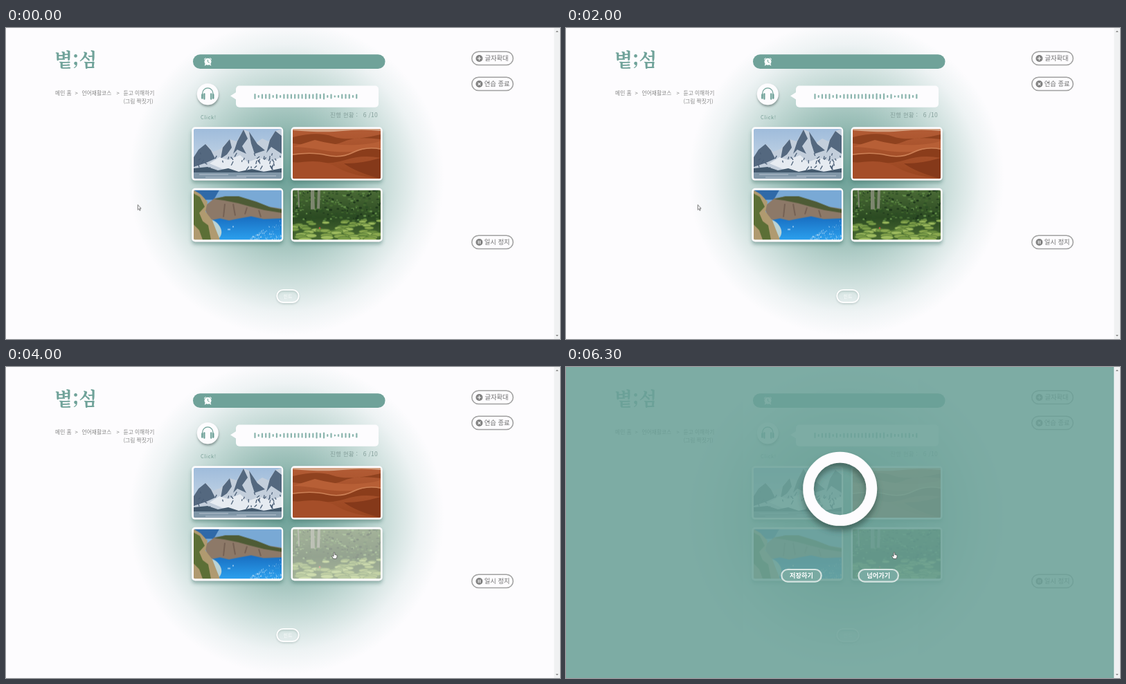
An HTML page for the animation above (6400 ms loop, 800 px wide and 450 px high).

```html
<!DOCTYPE html>
<html lang="ko">
<head>
<meta charset="utf-8">
<title>듣고 이해하기</title>
<style>
  html, body { margin: 0; width: 100%; height: 100%; overflow: hidden; background: #fdfcfe; }
  svg.stage { display: block; width: 100vw; height: 100vh; }
  text { font-family: "Noto Sans CJK KR", "Noto Sans CJK", "Noto Sans", sans-serif; }
  .brand { font: 700 27px "Noto Serif CJK KR", "Noto Serif", serif; fill: #6fa299; }
  .path { font-size: 7.75px; fill: #858585; }
  .side text { font-size: 9.25px; fill: #6e6e6e; }
  .status { font-size: 8.5px; letter-spacing: .25px; fill: #849f9a; }
  .click { font-size: 7.4px; font-weight: 500; letter-spacing: .6px; fill: #789f97; }
  .choice { font-size: 9.2px; font-weight: 700; fill: #fff; text-anchor: middle; }
  .hint { font-size: 7.2px; fill: #f8fbfa; text-anchor: middle; }

  .modal, .cursor, .arrow, .hand, .cove, .forest { animation: 6400ms linear infinite; }
  .modal { animation-name: slide; }
  .cursor { animation-name: travel; }
  .arrow { animation-name: arrow; }
  .hand { animation-name: hand; }
  .cove { animation-name: pass; }
  .forest { animation-name: hover; }

  @keyframes slide {
    0%, 76.7% { transform: translateY(450px); animation-timing-function: ease; }
    81.4%, 100% { transform: translateY(0); }
  }
  @keyframes travel {
    0%, 39.8% { transform: translate(190px, 255.5px); animation-timing-function: ease-in; }
    45.3% { transform: translate(235.5px, 255px); }
    51% { transform: translate(398px, 263px); animation-timing-function: ease-out; }
    56%, 100% { transform: translate(474px, 268px); }
  }
  @keyframes arrow {
    0%, 46.5% { opacity: 1; }
    46.51%, 100% { opacity: 0; }
  }
  @keyframes hand {
    0%, 46.5% { opacity: 0; }
    46.51%, 100% { opacity: 1; }
  }
  @keyframes pass {
    0%, 46.5% { opacity: 1; }
    48.5%, 51% { opacity: .5; }
    53%, 100% { opacity: 1; }
  }
  @keyframes hover {
    0%, 51.5% { opacity: 1; }
    54%, 81.4% { opacity: .5; }
    85%, 100% { opacity: 1; }
  }
</style>
</head>
<body>
<svg class="stage" viewBox="0 0 800 450" preserveAspectRatio="none">
  <defs>
    <radialGradient id="glow" gradientUnits="userSpaceOnUse" cx="405" cy="217" r="228">
      <stop offset="0" stop-color="#6fa299"/>
      <stop offset=".3" stop-color="#8fb7af"/>
      <stop offset=".6" stop-color="#c3d9d5"/>
      <stop offset=".85" stop-color="#eef3f4"/>
      <stop offset="1" stop-color="#fdfcfe"/>
    </radialGradient>
    <linearGradient id="sky" x2="0" y2="1">
      <stop stop-color="#9fbcdb"/><stop offset="1" stop-color="#d4dfea"/>
    </linearGradient>
    <linearGradient id="sand" x2="0" y2="1">
      <stop stop-color="#b35c35"/><stop offset="1" stop-color="#98441f"/>
    </linearGradient>
    <linearGradient id="bay" x2="0" y2="1">
      <stop stop-color="#1769bd"/><stop offset="1" stop-color="#2ba0ee"/>
    </linearGradient>
    <linearGradient id="wood" x2="0" y2="1">
      <stop stop-color="#4a6a36"/><stop offset=".55" stop-color="#2b4a22"/><stop offset="1" stop-color="#4b6b33"/>
    </linearGradient>
    <clipPath id="frame"><rect width="127" height="72" rx="2"/></clipPath>
    <filter id="shade" x="-20%" y="-20%" width="140%" height="150%">
      <feDropShadow dx="0" dy="4" stdDeviation="2.5" flood-color="#396d64" flood-opacity=".42"/>
    </filter>
    <filter id="soft" x="-20%" y="-20%" width="140%" height="160%">
      <feDropShadow dx="0" dy="1.5" stdDeviation="1.2" flood-color="#4d6f69" flood-opacity=".3"/>
    </filter>
    <filter id="lift" x="-30%" y="-30%" width="160%" height="170%">
      <feDropShadow dx=".5" dy="2.5" stdDeviation="1.6" flood-color="#4d5f5c" flood-opacity=".55"/>
    </filter>
    <filter id="ring" x="-30%" y="-30%" width="160%" height="170%">
      <feDropShadow dx="0" dy="7" stdDeviation="4.5" flood-color="#2f4b46" flood-opacity=".65"/>
    </filter>
  </defs>

  <rect width="800" height="450" fill="#fdfcfe"/>
  <circle cx="405" cy="217" r="228" fill="url(#glow)"/>

  <text class="brand" x="70" y="56">볕;섬</text>
  <g class="path">
    <text x="71" y="97">메인 홈</text>
    <text x="99.5" y="97">&gt;</text>
    <text x="109.5" y="97">언어재활코스</text>
    <text x="159.5" y="97">&gt;</text>
    <text x="169.5" y="97">듣고 이해하기</text>
    <text x="169.5" y="108.5">(그림 짝짓기)</text>
  </g>

  <!-- timer bar -->
  <rect x="270" y="38.3" width="277.5" height="20.7" rx="10.3" fill="#6fa299"/>
  <g transform="translate(291.5 48.8)" fill="#fff">
    <circle r="5"/>
    <path d="M-5.6-2.6A3 3 0 0 1-2.2-5.6ZM5.6-2.6A3 3 0 0 0 2.2-5.6ZM-3.6 3l-1.4 2.4h1.6l1.4-1.4ZM3.6 3l1.4 2.4H3.4L2 4Z"/>
    <path d="M0-3V.3L2.2 1.6" fill="none" stroke="#6fa299"/>
  </g>

  <!-- sound prompt -->
  <g filter="url(#lift)"><circle cx="291.3" cy="95.7" r="15.5" fill="#fdfcfe"/></g>
  <g transform="translate(291.3 96)" fill="#6fa299">
    <path d="M-7.6 3V-1.5a7.6 7.6 0 0 1 15.2 0V3" fill="none" stroke="#6fa299" stroke-width="1.3"/>
    <rect x="-9.2" y="-.8" width="2.6" height="7.6" rx="1.2"/>
    <rect x="-6" y="-1.8" width="2.2" height="9.6" rx="1"/>
    <rect x="3.8" y="-1.8" width="2.2" height="9.6" rx="1"/>
    <rect x="6.6" y="-.8" width="2.6" height="7.6" rx="1.2"/>
  </g>
  <text class="click" x="281" y="131.5">Click!</text>
  <path d="M324 98.2 333 92.5V104Z" fill="#fdfcfe"/>
  <rect x="332" y="83.5" width="206" height="31.3" rx="5" fill="#fdfcfe"/>
  <g id="wave" fill="#8ab4ad"></g>
  <text class="status" x="468" y="129">진행 현황 :</text>
  <text class="status" x="515.8" y="129">6 /10</text>

  <!-- picture cards -->
  <g id="cards" fill="#fdfcfe" filter="url(#shade)"></g>

  <g transform="translate(271 146)" clip-path="url(#frame)">
    <rect width="127" height="72" fill="url(#sky)"/>
    <path d="M0 44 9 30 18 22 28 33 39 29 52 15 62 18 72 1 80 4 90 20 99 14 108 18 118 3 127 0V72H0Z" fill="#c3cedb"/>
    <path d="M0 41 7 30 17 22 25 31 31 43 18 49 0 55ZM42 27 52 15 55 27 48 37 39 43ZM72 1 78 14 70 25 76 36 63 30 57 36 63 18ZM80 4 92 22 103 31 88 36 83 21ZM118 3 127 10V36L112 26 105 35 110 16Z" fill="#54687f"/>
    <path d="M23 50 37 41 50 45 67 38 78 48 95 42 112 47 127 41V57L106 62 88 58 64 63 42 58Z" fill="#e6ebf1"/>
    <g id="crags" stroke="#4b5f77" stroke-width="1.3"></g>
    <path d="M0 57 20 55 35 60 50 57 65 62 84 58 101 62 127 57V65H0Z" fill="#43596d"/>
    <path d="M0 63H127V72H0Z" fill="#8096a7"/>
    <path d="M8 66H50M62 68H119M17 70H76" stroke="#b5c4cf" stroke-width="1.2"/>
  </g>

  <g transform="translate(414 146)" clip-path="url(#frame)">
    <rect width="127" height="72" fill="url(#sand)"/>
    <path d="M0 0H127V3Q99 0 72 3T0 2Z" fill="#d3a182"/>
    <path d="M0 12Q35 3 58 11T127 8V15Q91 10 72 19T0 21Z" fill="#8f421f"/>
    <path d="M32 16Q65 25 93 23T127 17V30Q73 36 45 31T0 26Z" fill="#b75f36"/>
    <path d="M0 38Q30 33 51 38T90 34 127 30V42Q100 37 76 45T0 48Z" fill="#8b3d1b"/>
    <path d="M0 37Q29 33 49 38T87 34 127 29" fill="none" stroke="#cc8056" stroke-width="1.4"/>
    <path d="M0 50Q42 42 63 55T127 72H0Z" fill="#a54e29"/>
    <path d="M74 50Q96 51 127 42V72Q92 63 74 50Z" fill="#85391a"/>
  </g>

  <rect x="271" y="235" width="127" height="71" fill="#fdfcfe"/>
  <g class="cove"><g transform="translate(271 234.5)" clip-path="url(#frame)">
    <rect width="127" height="72" fill="#79a9d5"/>
    <path d="M0 0H37L29 14H0Z" fill="#2f69a8"/>
    <path d="M0 35H127V72H0Z" fill="url(#bay)"/>
    <path d="M15 24 30 12 47 9 66 10 87 16 108 24 127 27V41L101 42 83 38 66 41 51 44 38 41 23 44Z" fill="#8d7968"/>
    <path d="M29 13 46 9 65 9 91 17 111 25 127 28V33L102 29 82 24 64 19 44 15Z" fill="#4e5b35"/>
    <path d="M45 20 43 39M57 20 60 37M77 25 74 35M94 29 97 39" stroke="#756154" stroke-width="2"/>
    <path d="M14 40Q32 42 38 53T34 72H10Z" fill="#b9d3d6"/>
    <path d="M0 0 10 6 20 17 17 31 27 44 32 57 38 72H0Z" fill="#b09a70"/>
    <path d="M0 5 9 10 16 24 8 33 13 45 21 51 25 72H13L8 58 0 50Z" fill="#5c6f36"/>
    <path d="M49 57h4M56 53h2" stroke="#fff"/>
    <g id="spray" fill="#d3e9f8"></g>
  </g></g>

  <rect x="414" y="235" width="127" height="71" fill="#fdfcfe"/>
  <g class="forest"><g transform="translate(414 234.5)" clip-path="url(#frame)">
    <rect width="127" height="72" fill="url(#wood)"/>
    <g id="leaves"></g>
    <path d="M26 0h5l1 28h-6ZM36 0h4l-1 27h-4ZM7 0h2l1 25H8Z" fill="#7d866f"/>
    <g id="pads" stroke="#4d7132" stroke-width=".8"></g>
    <circle cx="39" cy="55" r="1.3" fill="#c95a45"/>
  </g></g>

  <g filter="url(#soft)">
    <rect x="391.3" y="378.8" width="31.4" height="18.2" rx="9" fill="none" stroke="#fff" stroke-width="1.8"/>
  </g>
  <text class="hint" x="407" y="390.5">힌트</text>

  <!-- side buttons -->
  <g class="side" fill="#fdfcfe" stroke="#a0a0a0" stroke-width="1.5">
    <rect x="672.7" y="34.2" width="59.6" height="19.4" rx="9.7"/>
    <rect x="672.7" y="71.2" width="59.6" height="19.4" rx="9.7"/>
    <rect x="672.7" y="300.2" width="59.6" height="19.4" rx="9.7"/>
    <g fill="#818181" stroke="none">
      <circle cx="683.4" cy="44" r="5"/><circle cx="683.4" cy="81" r="5"/><circle cx="683.4" cy="310" r="5"/>
      <text x="691.5" y="47.3">글자확대</text>
      <text x="690.8" y="84.3">연습 종료</text>
      <text x="690.8" y="313.3">일시 정지</text>
    </g>
    <path d="M680.7 44h5.4M683.4 41.3v5.4M681.5 79.1l3.8 3.8M685.3 79.1l-3.8 3.8M682.2 307.8v4.4M684.6 307.8v4.4" stroke="#fff" stroke-width="1.1"/>
  </g>

  <!-- answer overlay -->
  <g class="modal">
    <rect width="791.5" height="450" fill="#6ca198" fill-opacity=".88"/>
    <g filter="url(#ring)">
      <circle cx="395.7" cy="176.3" r="45.7" fill="none" stroke="#fdfcfe" stroke-width="15.6"/>
    </g>
    <g fill="#79aaa2" stroke="#d6e4e1" stroke-width="2.2">
      <rect x="311.3" y="293" width="57.4" height="17.6" rx="8.8"/>
      <rect x="422.5" y="293" width="57.4" height="17.6" rx="8.8"/>
    </g>
    <text class="choice" x="340" y="305">저장하기</text>
    <text class="choice" x="451.2" y="305">넘어가기</text>
  </g>

  <rect x="791.5" width="8.5" height="450" fill="#f0f1f2"/>
  <path d="M793.8 6 795.8 3.8 797.8 6ZM793.8 444 795.8 446.2 797.8 444Z" fill="#888"/>

  <g class="cursor" fill="#fff" stroke="#444" stroke-width=".7">
    <path class="arrow" d="M.3.3V7.6L1.9 6.1 3.1 8.6 4.2 8 3 5.6H5.1Z"/>
    <path class="hand" d="M-.9.6Q0-.6.8.6V3.4L3.6 4.2Q4.4 4.7 4.1 6L3.2 9.3H-1.2L-3.6 5.6Q-3.3 4.3-1.9 5.4L-.9 6.1Z"/>
  </g>
</svg>

<script>
  const $ = id => document.getElementById(id);

  function add(parent, tag, attrs) {
    const el = document.createElementNS("http://www.w3.org/2000/svg", tag);
    for (const key in attrs) el.setAttribute(key, attrs[key]);
    return parent.appendChild(el);
  }

  let seed = 7;
  function rnd(min, max) {
    seed = seed * 16807 % 2147483647;
    return min + (max - min) * seed / 2147483647;
  }

  for (const x of [268.2, 411.6])
    for (const y of [143.2, 231.8])
      add($("cards"), "rect", { x, y, width: 132, height: 77.4, rx: 5 });

  for (let i = 0; i < 40; i++) {
    const x = rnd(0, 125), y = rnd(34, 56);
    add($("crags"), "path", { d: `M${x} ${y}l${rnd(-4, 4)} ${rnd(2, 6)}` });
  }
  for (let i = 0; i < 260; i++)
    add($("leaves"), "ellipse", {
      cx: rnd(0, 127), cy: rnd(0, 46), rx: rnd(.8, 2.6), ry: rnd(.5, 1.5),
      fill: ["#1d361b", "#446b30", "#64904a", "#2c4f25"][i % 4]
    });
  for (let i = 0; i < 62; i++) {
    const cy = 44 + i * .45, size = 5 + i * .08;
    add($("pads"), "ellipse", {
      cx: rnd(0, 127), cy, rx: size, ry: size * .34,
      fill: ["#8aa84f", "#9dba5e", "#7b9d48"][i % 3]
    });
  }
  for (let i = 0; i < 110; i++) {
    const x = rnd(82, 127);
    add($("spray"), "circle", { cx: x, cy: rnd(72 - (x - 78) * .65, 72), r: rnd(.25, .7) });
  }

  // Bars swing between two height profiles every second.
  const low = [8, 4, 7, 7, 8, 4, 7, 4, 7, 7, 7, 7, 7, 7, 8, 7, 7, 9, 7, 9, 4, 7, 3, 4, 7, 7, 7, 4, 7];
  const high = [...low.slice(0, 18), 7, 5, 4, 7, 11, 6, 7, 6, 10, 8, 8];
  low.forEach((h, i) => {
    const bar = add($("wave"), "rect", { x: 358.4 + i * 5.24, y: 99 - h / 2, width: 2.2, height: h, rx: 1.1 });
    bar.style.transformOrigin = "0 99px";
    const frames = Array.from({ length: 65 }, (_, k) => {
      const mix = (1 - Math.cos(Math.PI * k / 10)) / 2;
      return { transform: `scaleY(${1 + (high[i] / h - 1) * mix})` };
    });
    bar.animate(frames, { duration: 6400, iterations: Infinity });
  });
</script>
</body>
</html>
```
